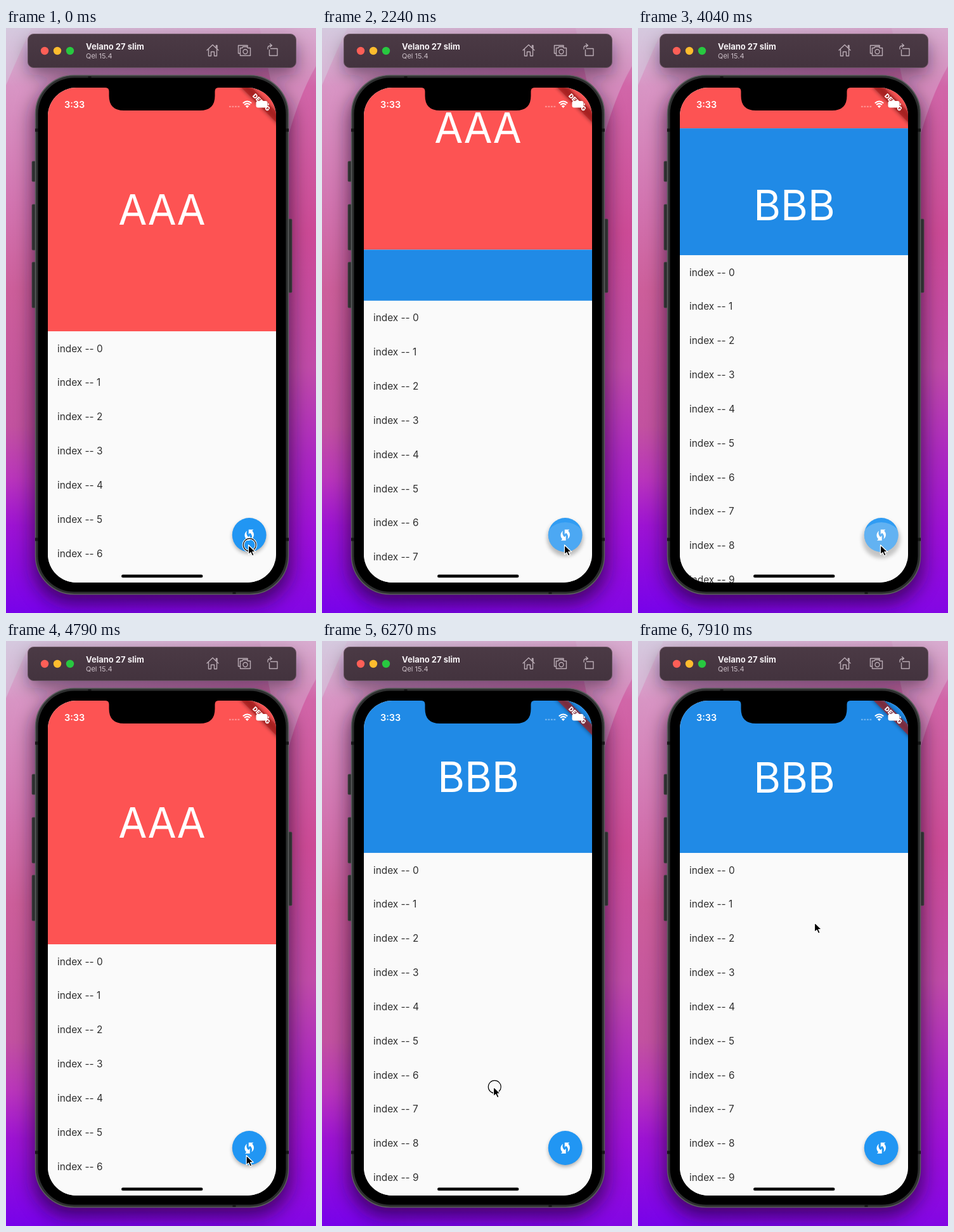
Animation of 489x922 px, one loop 8000 ms. Source, as an HTML page:

```html
<!DOCTYPE html>
<html lang="en">
<head>
<meta charset="utf-8">
<title>Switching header</title>
<style>
html, body { margin: 0; width: 100%; height: 100%; overflow: hidden; }
svg { display: block; width: 489px; height: 922px; font-family: Inter, "Open Sans", sans-serif; }
.big { font-size: 65.5px; font-weight: 370; text-anchor: middle; fill: #fff; }
.icon { fill: none; stroke: #b9abb4; stroke-width: 1.4; stroke-linejoin: round; stroke-linecap: round; }
#list text { font-size: 15.36px; fill: #2f2f2f; }
</style>
</head>
<body>
<svg viewBox="0 0 489 922">
  <defs>
    <linearGradient id="wallLeft" x2="0" y2="1">
      <stop offset="0" stop-color="#d6c3dc"/><stop offset=".1" stop-color="#d895c4"/>
      <stop offset=".3" stop-color="#d274b0"/><stop offset=".45" stop-color="#cc5e9a"/>
      <stop offset=".68" stop-color="#c2529f"/><stop offset=".77" stop-color="#b935bb"/>
      <stop offset=".85" stop-color="#9d13d2"/><stop offset="1" stop-color="#7802ea"/>
    </linearGradient>
    <linearGradient id="wallRight" x2="0" y2="1">
      <stop offset="0" stop-color="#d7a3cb"/><stop offset=".1" stop-color="#d166a8"/>
      <stop offset=".35" stop-color="#cc4a96"/><stop offset=".58" stop-color="#c04ba8"/>
      <stop offset=".74" stop-color="#aa26c2"/><stop offset=".86" stop-color="#9c10d6"/>
      <stop offset="1" stop-color="#8306e4"/>
    </linearGradient>
    <linearGradient id="across">
      <stop offset=".1" stop-color="#000"/><stop offset=".9" stop-color="#fff"/>
    </linearGradient>
    <mask id="fade"><rect width="489" height="922" fill="url(#across)"/></mask>
    <linearGradient id="bar" x2="0" y2="1">
      <stop offset="0" stop-color="#4b3a45"/><stop offset="1" stop-color="#43333e"/>
    </linearGradient>
    <filter id="wide" x="-40%" y="-100%" width="180%" height="300%"><feGaussianBlur stdDeviation="14"/></filter>
    <filter id="soft" x="-50%" y="-50%" width="200%" height="200%"><feGaussianBlur stdDeviation="3"/></filter>
    <clipPath id="screen"><rect x="66" y="94" width="360" height="780" rx="45"/></clipPath>
    <clipPath id="disc"><circle cx="383.7" cy="799" r="26.9"/></clipPath>
  </defs>

  <rect width="489" height="922" fill="url(#wallLeft)"/>
  <rect width="489" height="922" fill="url(#wallRight)" mask="url(#fade)"/>
  <path d="M489 60Q460 110 440 190L400 0H489Z" fill="#d9b6d6" opacity=".45"/>
  <path d="M0 90Q30 20 40 0H0Z" fill="#d5d0e2" opacity=".5"/>

  <g fill="#1c0024" filter="url(#wide)">
    <rect x="42" y="86" width="408" height="822" rx="62" opacity=".62"/>
    <rect x="36" y="22" width="421" height="52" rx="10" opacity=".5"/>
  </g>

  <rect x="34.5" y="9.5" width="423" height="53" rx="9" fill="url(#bar)" stroke="#67535f"/>
  <circle cx="61" cy="36" r="6.2" fill="#fe5f57"/>
  <circle cx="81" cy="36" r="6.2" fill="#febc2e"/>
  <circle cx="101" cy="36" r="6.2" fill="#28c840"/>
  <text x="126" y="34" font-size="13" font-weight="700" fill="#f6f2f5">Velano 27 slim</text>
  <text x="126" y="48" font-size="11" fill="#cbbfc7">Qel 15.4</text>
  <g class="icon">
    <path d="M317 35L326 26.5L335 35M319.5 33.5V44H323.5V37.5H328.5V44H332.5V33.5M331.5 30V27.5H333V32"/>
    <path d="M369 40H366.5V27.5H381V29.5M369.5 31.5H372.5L374 29.5H380L381.5 31.5H385.5V43.5H369.5Z"/>
    <circle cx="377.5" cy="37.3" r="3.5"/>
    <path d="M417.5 32.5H428V43.5H415.5V34.5M413 33Q412 27.5 419 27.5M416.5 25L419.5 27.5L416.5 30"/>
  </g>

  <g fill="#2d2e2f" stroke="#48494a" stroke-width=".8">
    <rect x="41" y="210" width="7" height="32" rx="1.5"/>
    <rect x="41" y="278" width="7" height="72" rx="1.5"/>
    <rect x="41" y="369" width="7" height="72" rx="1.5"/>
    <rect x="444" y="301" width="7" height="116" rx="1.5"/>
  </g>
  <rect x="46.5" y="74.5" width="399" height="818" rx="61" fill="#2d2f2f" stroke="#5b5e5e" stroke-width="1.5"/>
  <path d="M46 161H51M441 161H446M46 806H51M441 806H446M132 76V79M360 889V892" stroke="#161717" stroke-width="5"/>
  <rect x="50.5" y="78.5" width="391" height="810" rx="57"/>

  <g clip-path="url(#screen)">
    <rect x="66" y="94" width="360" height="780" fill="#fafafa"/>
    <g id="red">
      <rect x="66" width="360" height="384" fill="#fd5353"/>
      <text class="big" x="246" y="216">AAA</text>
    </g>
    <g id="blue">
      <rect x="66" width="360" height="240" fill="#208ae6"/>
      <text class="big" x="246.5" y="144.5">BBB</text>
    </g>
    <g id="list"><rect x="66" width="360" height="1000" fill="#fafafa"/></g>

    <circle id="shade" cx="383.7" filter="url(#soft)"/>
    <circle cx="383.7" cy="799" r="26.9" fill="#2196f3"/>
    <g fill="#eee" clip-path="url(#disc)">
      <circle id="lit" cx="383.7" cy="799" r="27"/>
      <circle id="ripple" cx="383.7" cy="814" r="35"/>
    </g>
    <g transform="translate(372.2 787.5) scale(.96)" fill="#fff">
      <path d="M16.71 5.29L19 3H11V11L13.3 8.7C15.27 10.16 16.55 12.48 16.55 15.12C16.55 16.43 16.23 17.66 15.67 18.75C18 17.23 19.54 14.61 19.54 11.63C19.54 9.05 18.44 6.97 16.71 5.29Z"/>
      <path d="M7.46 8.88C7.46 7.57 7.78 6.34 8.34 5.25C6 6.77 4.46 9.39 4.46 12.37C4.46 14.95 5.57 17.03 7.29 18.71L5 21H13V13L10.7 15.3C8.74 13.84 7.46 11.52 7.46 8.88Z"/>
    </g>

    <g transform="translate(426 94) rotate(45)">
      <rect x="-60" y="26.9" width="120" height="11.5" opacity=".5" filter="url(#soft)"/>
      <rect x="-60" y="26.9" width="120" height="11.5" fill="#b71c1c" fill-opacity=".63"/>
      <text y="36.2" font-size="9.8" font-weight="900" text-anchor="middle" fill="#fff">DEBUG</text>
    </g>
    <g fill="#fff">
      <text x="92" y="125.5" font-size="14.5" font-weight="600">3:33</text>
      <path d="M352 123.8H369" stroke="#fff" stroke-width="2.2" stroke-dasharray="2.8 1.7" opacity=".35"/>
      <path d="M373.8 118.5Q380.5 112.5 387.2 118.5M376 121Q380.5 117.2 385 121" fill="none" stroke="#fff" stroke-width="2"/>
      <path d="M380.5 126L377.7 123.1Q380.5 121 383.3 123.1Z"/>
      <rect x="394.5" y="115" width="18" height="10.5" rx="3"/>
      <rect x="413.2" y="118.5" width="1.4" height="3.8" rx=".7"/>
    </g>
    <path d="M157 94Q162.500 94 162.500 100V107Q162.500 130 186 130H306Q329.500 130 329.500 107V100Q329.500 94 335 94Z"/>
    <rect x="182" y="861.5" width="128.500" height="4.800" rx="2.400"/>
  </g>

  <g id="cursor">
    <g id="ring" fill="none">
      <circle cx="2.300" cy=".7" r="10" stroke="#fff" stroke-width="3.400"/>
      <circle cx="2.300" cy=".7" r="10" stroke="#000" stroke-width="1.200"/>
    </g>
    <path d="M.5 .7V15.700L4 12.600L6.500 17.900L9.200 16.700L6.800 11.500H11.500Z" stroke="#fff" stroke-width="1.200" stroke-linejoin="round"/>
  </g>
</svg>

<script>
const $ = id => document.getElementById(id);
const LOOP = 8000, TICK = 149.2, SNAP = 144, SWITCH = 200;

for (let i = 0; i < 18; i++) {
  $('list').insertAdjacentHTML('beforeend',
    `<text x="81" y="${32.6 + i * 53.83}">index -- ${i}</text>`);
}

// Button presses: [down, up] in ms. Each tap switches the header; the idle ones do not.
const idle = [[0, 90], [740, 850]];
const taps = [[1200, 1210], [2080, 2105], [3130, 3165], [3870, 3995]];

// Pointer stops: [ms, x, y, scroll]. The list is dragged wherever the scroll changes.
const stops = [
  [4720, 382, 814, 0], [5270, 259, 670, 0], [5660, 263, 526, SNAP], [5950, 263, 526, SNAP],
  [6260, 270, 702, SNAP], [7100, 276, 466, 380], [7300, 277, 207, 380], [7860, 278, 443, SNAP]
];

const clamp = v => Math.max(0, Math.min(1, v));
const ease = v => v * v * (3 - 2 * v);
const move = (id, x, y) => $(id).setAttribute('transform', `translate(${x} ${y})`);
const fade = (id, v) => $(id).setAttribute('opacity', v);

function pointerAt(t) {
  const i = Math.max(1, stops.findLastIndex(s => s[0] <= t) + 1);
  const a = stops[i - 1], b = stops[i] || a;
  const f = ease(clamp((t - a[0]) / (b[0] - a[0] || 1)));
  const [x, y, scroll] = [1, 2, 3].map(k => a[k] + (b[k] - a[k]) * f);
  return { x, y, scroll, dragging: a[3] !== b[3] };
}

function draw(now) {
  // The picture advances in equal hard steps.
  const t = Math.floor((now % LOOP) / TICK + .022) * TICK;
  const { x, y, scroll, dragging } = pointerAt(t);
  const switched = taps.reduce((sum, [, up], i) =>
    sum + (i % 2 ? -1 : 1) * clamp((t - up) / SWITCH), 0);
  const s = scroll + SNAP * switched;

  const redTop = 94 - 384 * Math.min(1, s / SNAP);
  move('red', 0, redTop);
  move('blue', 0, redTop + 384 - Math.max(0, s - SNAP));
  move('list', 0, 478 - s);
  move('cursor', x, y);

  const held = ([down, up]) => t >= down && t < up;
  fade('ring', dragging || [...idle, ...taps].some(held) ? 1 : 0);

  const glow = Math.max(...taps.map(([down, up]) =>
    t < down ? 0 : t < up ? .1 : clamp(1 - (t - up) / 260)));
  fade('lit', glow ? .07 : 0);
  fade('ripple', .3 * glow);
  fade('shade', .32 - .12 * glow);
  $('shade').setAttribute('cy', 802 + 4 * glow);
  $('shade').setAttribute('r', 26.5 + 4 * glow);
  requestAnimationFrame(draw);
}
requestAnimationFrame(draw);
</script>
</body>
</html>
```
